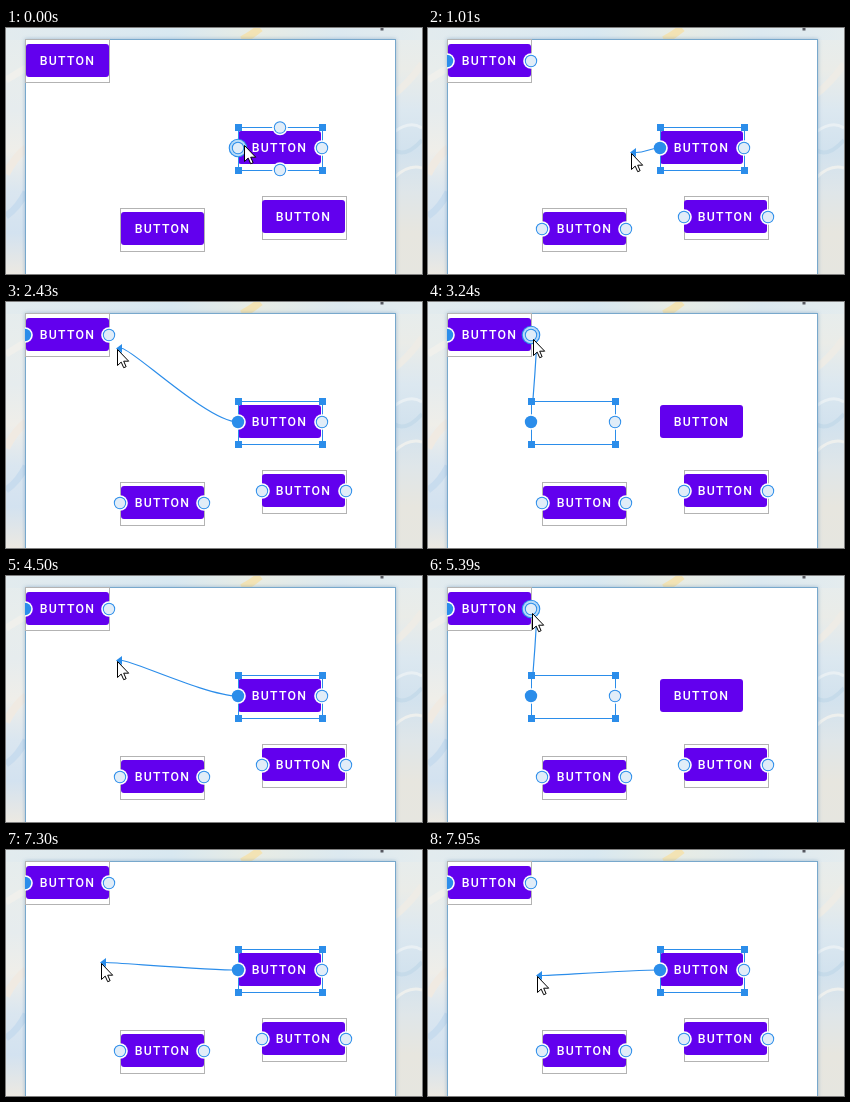
An HTML page with a canvas that plays this animation: 416x246 px, repeating every 7.99 s.

```html
<!DOCTYPE html>
<html lang="en">
<head>
<meta charset="utf-8">
<title>Constraint drag</title>
<style>
  html, body { margin: 0; width: 100%; height: 100%; overflow: hidden; }
  canvas { display: block; width: 416px; height: 246px; }
</style>
</head>
<body>
<canvas id="stage"></canvas>
<script>
const W = 416, H = 246, LOOP = 7990;
const BLUE = '#2b8dea', PURPLE = '#6200ee';
const canvas = document.getElementById('stage');
const dpr = window.devicePixelRatio || 1;
canvas.width = W * dpr;
canvas.height = H * dpr;
const ctx = canvas.getContext('2d');

// x, y: corner of the bounds; left, top: corner of the painted button
const VIEW_W = 84, VIEW_H = 43;
const first = { x: 19.5, y: 11.5, left: 20, top: 16 };
const dragged = { x: 232.5, y: 99.5, left: 232, top: 103 };
const preview = { ...dragged, x: 103.5 };
const others = [
  { x: 114.5, y: 180.5, left: 115, top: 184 },
  { x: 256.5, y: 168.5, left: 256, top: 172 }
];
const target = { x: 103, y: 33 };
const PRESS = 450;

// Pointer path: time, x, y
const path = [
  [0, 238, 117], [PRESS, 238, 117], [1010, 203, 125], [1600, 158, 104],
  [2150, 116, 54], [2430, 111, 47], [2750, 105, 37], [3450, 105, 37],
  [3800, 113, 60], [4200, 112, 82], [4500, 111, 85], [4850, 113, 74],
  [5150, 105, 37], [5450, 104, 37], [5850, 40, 43], [6240, 35, 45],
  [6500, 37, 46], [7000, 78, 96], [7500, 104, 122], [7950, 109, 126], [LOOP, 109, 126]
];

// The pointer sits on whole pixels
function pointerAt(t) {
  let i = 1;
  while (i < path.length - 1 && t > path[i][0]) i++;
  const [t0, x0, y0] = path[i - 1], [t1, x1, y1] = path[i];
  const p = Math.min(1, (t - t0) / (t1 - t0));
  const e = p * p * (3 - 2 * p);
  return { x: Math.round(x0 + (x1 - x0) * e), y: Math.round(y0 + (y1 - y0) * e) };
}

function polygon(points, fill, stroke) {
  ctx.beginPath();
  points.forEach(([x, y]) => ctx.lineTo(x, y));
  ctx.closePath();
  if (fill) { ctx.fillStyle = fill; ctx.fill(); }
  if (stroke) { ctx.strokeStyle = stroke; ctx.lineWidth = 1; ctx.stroke(); }
}

function disc(x, y, r, fill) {
  ctx.beginPath();
  ctx.arc(x, y, r, 0, Math.PI * 2);
  ctx.fillStyle = fill;
  ctx.fill();
}

function streak(x0, y0, cx, cy, x1, y1, color, width) {
  ctx.beginPath();
  ctx.moveTo(x0, y0);
  ctx.quadraticCurveTo(cx, cy, x1, y1);
  ctx.strokeStyle = color;
  ctx.lineWidth = width;
  ctx.stroke();
}

function gradientRect(x, y, w, h, dx, dy, colors) {
  const g = ctx.createLinearGradient(x, y, x + dx, y + dy);
  colors.forEach((c, i) => g.addColorStop(i / (colors.length - 1), c));
  ctx.fillStyle = g;
  ctx.fillRect(x, y, w, h);
}

function backdrop() {
  gradientRect(0, 0, 210, H, 0, H,
    ['#e4ecee', '#e8edec', '#e6ecee', '#efeee9', '#dae6f0', '#d3e2f0', '#ece9e2']);
  gradientRect(210, 0, 206, H, 0, H,
    ['#e6edee', '#eaece8', '#dce8f0', '#d2e2ee', '#dfe6e9', '#e7e6df', '#e6e6e0']);
  gradientRect(0, 0, W, 12, W, 0,
    ['#e2ebee', '#deeaf0', '#d8e8f1', '#e8ece4', '#dce9f0', '#e4ecee']);
  streak(236, 12, 246, 7, 254, 0, '#f3e3b4', 8);
  streak(0, 52, 10, 46, 20, 40, '#f0f0ec', 7);
  streak(0, 146, 8, 130, 20, 120, '#f0eae2', 8);
  streak(0, 188, 12, 180, 20, 164, '#c8dcee', 7);
  streak(388, 66, 402, 56, 416, 36, '#eeece6', 7);
  streak(388, 104, 404, 92, 416, 100, '#e9f0f4', 3);
  streak(388, 122, 400, 130, 416, 112, '#c6dbea', 4);
  streak(388, 150, 402, 136, 416, 140, '#eef0ee', 3);
  ctx.fillStyle = '#55575f';
  ctx.fillRect(374.5, 0, 3, 2.5);

  ctx.save();
  ctx.shadowColor = 'rgba(70,120,165,.45)';
  ctx.shadowBlur = 4 * dpr;
  ctx.fillStyle = '#fff';
  ctx.fillRect(19, 11, 371, H);
  ctx.restore();
  ctx.strokeStyle = '#78a8cc';
  ctx.lineWidth = 1;
  ctx.strokeRect(19.5, 11.5, 370, H);
}

function button({ left, top }) {
  ctx.beginPath();
  ctx.roundRect(left, top, 83, 33, 3);
  ctx.fillStyle = PURPLE;
  ctx.fill();
  ctx.font = '500 12.3px Roboto, sans-serif';
  ctx.letterSpacing = '1.25px';
  ctx.fillStyle = '#fff';
  ctx.fillText('BUTTON', left + 13.8, top + 21.2);
}

function bounds({ x, y }, color) {
  ctx.strokeStyle = color;
  ctx.lineWidth = 1;
  ctx.strokeRect(x, y, VIEW_W, VIEW_H);
}

function anchor(x, y, filled, hot) {
  if (hot) {
    disc(x, y, 9.3, BLUE);
    disc(x, y, 8.2, '#b9dcf8');
  } else {
    disc(x, y, 7.8, '#fff');
  }
  disc(x, y, 6.2, BLUE);
  if (!filled) disc(x, y, 5.2, '#e1edf8');
}

function sideAnchors({ x, top }, leftFilled, hotLeft, hotRight) {
  anchor(x - 0.5, top + 17, leftFilled, hotLeft);
  anchor(x + VIEW_W - 0.5, top + 17, false, hotRight);
}

function selection({ x, y }) {
  bounds({ x, y }, BLUE);
  ctx.fillStyle = BLUE;
  for (const dx of [0, VIEW_W])
    for (const dy of [0, VIEW_H]) ctx.fillRect(x + dx - 3.5, y + dy - 3.5, 7, 7);
}

function connector(tip) {
  const from = { x: 232, y: 120 };
  const end = tip.x + 6, reach = Math.max(0, from.x - end) * 0.4;
  ctx.beginPath();
  ctx.moveTo(from.x, from.y);
  ctx.bezierCurveTo(from.x - Math.min(30, reach), from.y,
    end + Math.min(10, reach), tip.y, end, tip.y);
  ctx.strokeStyle = BLUE;
  ctx.lineWidth = 1.2;
  ctx.stroke();
  polygon([[tip.x, tip.y], [end, tip.y - 4.5], [end, tip.y + 4.5]], BLUE);
}

function arrow({ x, y }) {
  ctx.save();
  ctx.translate(x + 0.5, y + 0.5);
  polygon([[0, 0], [0, 16], [3.7, 12.6], [6.2, 18.2], [8.6, 17.2], [6.2, 11.7], [11.2, 11.7]],
    '#fff', '#000');
  ctx.restore();
}

function hand({ x, y }) {
  ctx.save();
  ctx.translate(x - 1.5, y + 0.5);
  ctx.beginPath();
  ctx.moveTo(-2, 1);
  ctx.quadraticCurveTo(0, -2, 2, 1);
  ctx.lineTo(2, 7);
  ctx.quadraticCurveTo(4.5, 5, 5.5, 8);
  ctx.quadraticCurveTo(8, 6, 9, 9);
  ctx.quadraticCurveTo(11, 8, 11.5, 10.5);
  ctx.lineTo(11.5, 14);
  ctx.lineTo(9, 18.5);
  ctx.lineTo(9, 21);
  ctx.lineTo(-0.5, 21);
  ctx.lineTo(-0.5, 19);
  ctx.lineTo(-6, 12);
  ctx.quadraticCurveTo(-5.5, 9, -2, 12);
  ctx.closePath();
  ctx.fillStyle = '#fff';
  ctx.strokeStyle = '#000';
  ctx.lineWidth = 1.1;
  ctx.fill();
  ctx.stroke();
  for (const dx of [2, 5.5, 9]) streak(dx, 7.5, dx, 9, dx, 11, '#000', 1);
  ctx.restore();
}

function draw(t) {
  const pointer = pointerAt(t);
  const dragging = t >= PRESS;
  const snapped = dragging && Math.hypot(pointer.x - target.x, pointer.y - target.y) < 8;
  const over = dragging && !snapped && pointer.x < 103 && pointer.y < 54;

  ctx.setTransform(dpr, 0, 0, dpr, 0, 0);
  backdrop();
  for (const view of [first, ...others]) {
    bounds(view, '#b3b3b3');
    button(view);
  }
  if (over) {
    ctx.fillStyle = 'rgba(30,130,225,.35)';
    ctx.fillRect(first.x, first.y, VIEW_W, VIEW_H);
    bounds(first, '#8ab9e2');
  }
  if (dragging) {
    ctx.save();
    ctx.beginPath();
    ctx.rect(19, 11, 371, H);
    ctx.clip();
    sideAnchors(first, true, false, snapped);
    ctx.restore();
    others.forEach(view => sideAnchors(view));
  }

  button(dragged);
  if (snapped) {
    selection(preview);
    streak(105, 97, 107, 72, 108.5, 46, BLUE, 1.2);
    sideAnchors(preview, true);
  } else {
    selection(dragged);
    sideAnchors(dragged, dragging, !dragging);
    if (dragging) {
      connector({ x: pointer.x - 1, y: pointer.y - 0.5 });
    } else {
      anchor(274, 99.5);
      anchor(274, 142);
    }
  }
  (over ? hand : arrow)(pointer);
}

const start = performance.now();
function tick() {
  draw((performance.now() - start) % LOOP);
  requestAnimationFrame(tick);
}
tick();
</script>
</body>
</html>
```
